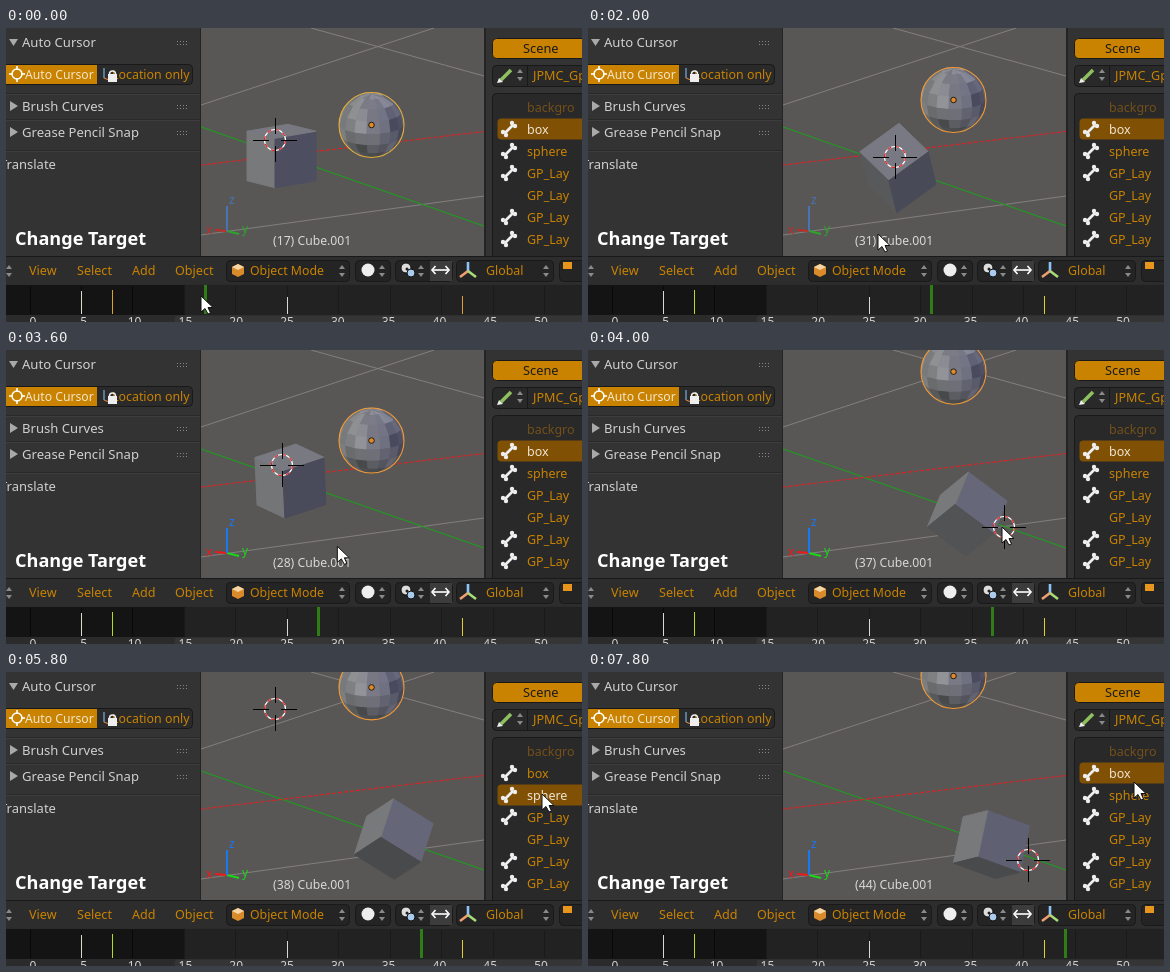
Write an HTML page with a canvas that moves like this. It is 576 px wide and 294 px high and loops after 8000 ms.

```html
<!DOCTYPE html>
<html lang="en">
<head>
<meta charset="utf-8">
<style>
html, body { margin: 0; width: 576px; height: 294px; overflow: hidden; background: #2b2b2b; }
canvas { display: block; }
</style>
</head>
<body>
<canvas id="stage" width="576" height="294"></canvas>
<script>
const c = document.getElementById('stage').getContext('2d');
const ORANGE = '#c98300', LIGHT = '#d0d0d0', DARK = '#242424', EDGE = '#191919';
const mix = (a, b, u) => a + (b - a) * u;
const clamp = v => Math.min(1, Math.max(0, v));
const smooth = s => s * s * (3 - 2 * s);

// ---------- drawing helpers ----------
function rect(x, y, w, h, fill) { c.fillStyle = fill; c.fillRect(x, y, w, h); }
function box(x, y, w, h, fill, edge) {
  c.beginPath(); c.roundRect(x + .5, y + .5, w, h, 4);
  c.fillStyle = fill; c.fill();
  if (edge) { c.strokeStyle = edge; c.lineWidth = 1; c.stroke(); }
}
function text(s, x, y, fill = LIGHT, size = 13, weight = 400) {
  c.font = `${weight} ${size}px "Noto Sans", "Open Sans", sans-serif`;
  c.fillStyle = fill; c.fillText(s, x, y);
}
function line(color, w, ...p) {
  c.beginPath();
  for (let i = 0; i < p.length; i += 2) c.lineTo(p[i], p[i + 1]);
  c.strokeStyle = color; c.lineWidth = w; c.stroke();
}
function poly(points, fill, edge) {
  c.beginPath();
  points.forEach(p => c.lineTo(p[0], p[1]));
  c.closePath(); c.fillStyle = fill; c.fill();
  if (edge) { c.strokeStyle = edge; c.lineWidth = 1; c.stroke(); }
}
function disc(x, y, r, fill, edge, w = 1) {
  c.beginPath(); c.arc(x, y, r, 0, 7);
  if (fill) { c.fillStyle = fill; c.fill(); }
  if (edge) { c.strokeStyle = edge; c.lineWidth = w; c.stroke(); }
}
function upDown(x, y) {
  for (const s of [-1, 1]) poly([[x - 3, y + s * 2], [x, y + s * 6], [x + 3, y + s * 2]], '#8a8a8a');
}

// ---------- motion ----------
// Each glide: start, end, target point
const GLIDES = [
  [200, 400, 189, 268], [1000, 1600, 290, 206], [3400, 4000, 414, 177],
  [4000, 4800, 536, 122], [6000, 6600, 546, 102], [7200, 7400, 546, 110]
];
function mouseAt(t) {
  return GLIDES.reduce(([x, y], [from, to, tx, ty]) => {
    const u = clamp((t - from) / (to - from));
    return [mix(x, tx, u), mix(y, ty, u)];
  }, [195, 268]);
}
// Scrub, pause, then play 15 to 56 at 24 frames a second
function frameAt(t) {
  if (t < 1400) return t < 400 ? 17 : 16;
  return 15 + Math.floor(16.63 + (t - 2000) * .02399 + 42) % 42;
}
// Ease between the keys at 25 and 42, Bezier handles at .39
function progress(frame) {
  const x = clamp((frame - 25) / 17);
  let s = x;
  for (let i = 0; i < 20; i++) s += (x - (1.17 * s * (1 - s) ** 2 + 1.83 * s * s * (1 - s) + s ** 3)) * .7;
  return smooth(clamp(s));
}

// ---------- 3D view ----------
function shade([x, y, z], lift = 0) {
  const key = Math.max(0, -.5 * x - .6 * y + .5 * z);
  const fill = Math.max(0, .8 * x - .2 * y + .5 * z);
  const v = 73 + lift + Math.min(47, key * 85);
  return `rgb(${v},${v + 1},${v + 3 + fill * 18})`;
}
function turn([x, y, z], angle) {
  const [a, b, d] = [-.971, -.08, -.224], k = Math.cos(angle), s = Math.sin(angle);
  const along = (a * x + b * y + d * z) * (1 - k);
  return [
    x * k + (b * z - d * y) * s + a * along,
    y * k + (d * x - a * z) * s + b * along,
    z * k + (a * y - b * x) * s + d * along
  ];
}
function drawCube(e) {
  const cx = mix(275.5, 403.5, e), cy = mix(128, 172.5, e), size = 50;
  const axes = [[.82, -.14, -.56], [-.56, -.14, -.82], [0, -.99, .14]].map(v => turn(v, e * 2.65));
  axes.forEach((v, i) => {
    const a = axes[(i + 1) % 3], b = axes[(i + 2) % 3], n = v.map(k => k * (Math.sign(v[2]) || 1));
    const corners = [[1, 1], [1, -1], [-1, -1], [-1, 1]].map(([p, q]) =>
      [0, 1].map(k => [cx, cy][k] + (n[k] + p * a[k] + q * b[k]) * size / 2));
    poly(corners, shade(n), shade(n));
  });
}
function drawSphere(x, y, edge) {
  const R = 32.5, LAT = 8, LON = 16, tilt = .3;
  const point = (i, j) => {
    const a = Math.PI * (i / LAT - .5), b = 2 * Math.PI * j / LON + .25;
    const px = Math.cos(a) * Math.sin(b), py = Math.sin(a), pz = Math.cos(a) * Math.cos(b);
    return [px, py * Math.cos(tilt) + pz * Math.sin(tilt), pz * Math.cos(tilt) - py * Math.sin(tilt)];
  };
  disc(x, y, R, '#66676f');
  for (let i = 0; i < LAT; i++) for (let j = 0; j < LON; j++) {
    const n = point(i + .5, j + .5);
    if (n[2] < 0) continue;
    const fill = shade(n, 12 + 14 * Math.sin(i * 5 + j * 8));
    poly([[0, 0], [1, 0], [1, 1], [0, 1]].map(([p, q]) => {
      const v = point(i + p, j + q);
      return [x + v[0] * R, y + v[1] * R];
    }), fill, fill);
  }
  disc(x, y, R, null, edge, 1.1);
  disc(x, y, 2.8, '#e08a25', '#1c1c1c');
}
function drawCursor(x, y) {
  disc(x, y, 10.5, null, '#fff', 1.2);
  c.setLineDash([4.1, 4.1]);
  disc(x, y, 10.5, null, '#e02020', 1.2);
  c.setLineDash([]);
  for (const s of [-1, 1]) {
    line('#000', 1, x + s * 6, y + .5, x + s * 22, y + .5);
    line('#000', 1, x + .5, y + s * 6, x + .5, y + s * 22);
  }
}
function drawView(t, frame, onSphere) {
  const e = progress(frame), sphereY = mix(97, 4, e);
  c.save();
  c.beginPath(); c.rect(195, 0, 283, 228); c.clip();
  rect(195, 0, 283, 228, '#595756');
  line('#827f7d', 1, 195, 77, 428, 0);
  line('#827f7d', 1, 305, 0, 478, 48);
  line('#827f7d', 1, 195, 207, 478, 168);
  line('#1aa01a', 1.1, 195, 99, 478, 198);
  c.setLineDash([4, 2]);
  line('#d82424', 1.2, 195, 137, 478, 103.5);
  c.setLineDash([]);
  drawCube(e);
  drawSphere(365.5, sphereY, t < 1200 ? '#e4ae3a' : '#f29a33');
  const follow = (e + smooth(e)) / 2;
  if (onSphere) drawCursor(269, Math.round(112 + (sphereY - 97) * .92));
  else drawCursor(Math.round(mix(269, 440, follow)), Math.round(mix(112, 188, follow)));

  const bright = t >= 3400;
  const red = bright ? '#f01818' : '#c02c28', green = bright ? '#18d818' : '#2ba52b', blue = bright ? '#1878f0' : '#4874b4';
  line(red, 2, 221, 203, 209, 202);
  line(green, 2, 221, 203, 233, 206);
  line(blue, 2, 221, 203, 221, 178);
  text('x', 200, 206, red, 12);
  text('y', 236, 205, green, 12);
  text('z', 223, 176, blue, 12);
  text(`(${frame}) Cube.001`, 267, 217, frame === 25 || frame === 42 ? '#e6e02c' : '#d8d8d8', 12.2);
  c.restore();
}

// ---------- panels ----------
function section(label, y, open) {
  poly(open ? [[3, y - 3], [12, y - 3], [7.5, y + 4]] : [[4, y - 5], [12, y], [4, y + 5]], '#a9a9a9');
  text(label, 16, y + 5, LIGHT, 13.1);
  for (let i = 0; i < 4; i++) for (const d of [-1, 2]) rect(171 + i * 3, y + d, 1, 1, '#858585');
}
function drawTools() {
  rect(0, 0, 195, 229, '#333');
  section('Auto Cursor', 14, true);
  section('Brush Curves', 78);
  section('Grease Pencil Snap', 104);
  for (const y of [65, 91, 122]) { rect(0, y, 194, 1, '#292929'); rect(0, y + 1, 194, 1, '#3d3d3d'); }
  box(-6, 36, 192, 20, '#2a2a2a', EDGE);
  rect(0, 37, 91, 19, ORANGE);
  disc(11, 46, 5, null, '#fff', 1.5);
  for (let a = 0; a < 6; a += Math.PI / 2) {
    const x = Math.cos(a), y = Math.sin(a);
    line('#fff', 1.6, 11 + x * 4, 46 + y * 4, 11 + x * 8, 46 + y * 8);
  }
  text('Auto Cursor', 19, 51, '#f3e6ca', 12.2);
  line('#7ab0e0', 1.2, 98, 40, 98, 50);
  line('#d08040', 1.2, 98, 50, 103, 52);
  text('Location only', 106, 51, ORANGE, 12.4);
  rect(102, 46, 9, 8, '#eee');
  c.beginPath(); c.arc(106.5, 46, 3, Math.PI, 0); c.strokeStyle = '#eee'; c.lineWidth = 1.5; c.stroke();
  text('Translate', -6, 141);
  text('Change Target', 9, 217, '#fff', 18.1, 600);
  rect(194, 0, 1, 229, DARK);
}
function bone(x, y) {
  line('#eee', 2.6, x - 4, y + 4, x + 4, y - 4);
  for (const s of [-1, 1]) {
    disc(x + s * 6, y - s * 3, 2.2, '#eee');
    disc(x + s * 3, y - s * 6, 2.2, '#eee');
  }
}
function drawOutliner(onSphere) {
  rect(478, 0, 98, 229, '#333');
  rect(478, 0, 2, 229, DARK);
  box(486, 10, 100, 20, ORANGE, EDGE);
  text('Scene', 517, 25, '#1a1a1a', 12.8);
  box(486, 37, 100, 21, '#292929', EDGE);
  line('#8fc060', 3.5, 495, 52, 505, 42);
  poly([[491, 55], [493, 50], [497, 54]], '#eee');
  upDown(514, 47);
  rect(521, 38, 1, 20, EDGE);
  text('JPMC_Gp', 527, 52, ORANGE, 12.6);
  box(486, 65, 100, 170, '#292929', EDGE);
  const active = onSphere ? 2 : 1, names = ['backgro', 'box', 'sphere'];
  box(491, 68 + active * 22, 100, 21, '#805005');
  for (let i = 0; i < 7; i++) {
    const y = 79 + i * 22;
    text(names[i] || 'GP_Lay', 521, y + 5, i === active ? '#f0e4d0' : i ? ORANGE : '#74501a', 12.5);
    if (i && i !== 4) bone(503, y);
  }
}
function drawHeader() {
  rect(0, 228, 576, 29, '#2d2d2d');
  rect(0, 228, 576, 1, EDGE);
  upDown(3, 243);
  [['View', 23], ['Select', 71], ['Add', 126], ['Object', 169]].forEach(([s, x]) => text(s, x, 247, ORANGE, 12.6));
  [[220, 123], [349, 35], [389, 57], [450, 97], [553, 40]].forEach(([x, w]) => box(x, 232, w, 21, DARK, EDGE));
  for (const x of [336, 376, 415, 540]) upDown(x, 243);
  poly([[226, 239], [232, 236], [238, 239], [238, 246], [232, 249], [226, 246]], '#d98a2b');
  poly([[226, 239], [232, 236], [238, 239], [232, 242]], '#f6d5a5');
  text('Object Mode', 244, 247, ORANGE, 12.3);
  disc(362, 242, 6.5, '#eee');
  disc(400, 240, 5, '#ddd', '#111');
  disc(405, 245, 4, '#a9cbee', '#111');
  disc(401, 241, 1.5, '#222');
  rect(424, 233, 22, 20, '#3c3c3c');
  line('#fff', 1.6, 427, 242, 442, 242);
  for (const s of [-1, 1]) line('#fff', 1.6, 434.5 + s * 5, 238, 434.5 + s * 8.5, 242, 434.5 + s * 5, 246);
  line('#8cc4f8', 2.6, 462, 243, 462, 234);
  line('#f0a070', 2.6, 462, 243, 454, 249);
  line('#a8dc78', 2.6, 462, 243, 470, 249);
  text('Global', 480, 247, ORANGE, 12.4);
  rect(557, 234, 9, 7, '#e8951e');
}
function drawTimeline(t, frame) {
  const at = f => Math.floor(24 + 10.296 * f), early = t < 1200;
  rect(0, 256, 576, 38, '#2b2b2b');
  rect(0, 257, 576, 30, '#222');
  rect(0, 257, 179, 30, '#141414');
  for (let f = 0; f <= 50; f += 5) rect(at(f), 258, 1, 28, f < 15 ? '#080808' : '#1a1a1a');
  rect(at(frame) - 1, 257, 3, 29, '#2f7d17');
  const key = (f, y, fill) => rect(at(f), y, 1, 286 - y, fill);
  key(5, 263, '#dcd8d0');
  key(8, 262, early ? '#e0a030' : '#b4dc24');
  key(25, 269, '#d8d8d4');
  key(42, 268, early ? '#e0a030' : '#e0d02c');
  box(168, 287, 430, 20, '#353535');
  c.textAlign = 'center';
  for (let f = 0; f <= 50; f += 5) text(f, 27 + 10.16 * f, 298, LIGHT, 12);
  c.textAlign = 'left';
}
function drawMouse([x, y]) {
  poly([[0, 0], [0, 16], [4, 12.5], [7, 18], [9.5, 17], [7, 11.5], [12, 11.5]].map(p => [x + p[0], y + p[1]]),
    '#fff', '#111');
}

function draw(now) {
  const t = Math.floor(now % 8000 / 200) * 200;
  const frame = frameAt(t), onSphere = t >= 5000 && t < 7400;
  drawView(t, frame, onSphere);
  drawTools();
  drawOutliner(onSphere);
  drawHeader();
  drawTimeline(t, frame);
  drawMouse(mouseAt(t));
}
const start = performance.now();
function tick() {
  draw(performance.now() - start);
  requestAnimationFrame(tick);
}
tick();
</script>
</body>
</html>
```
